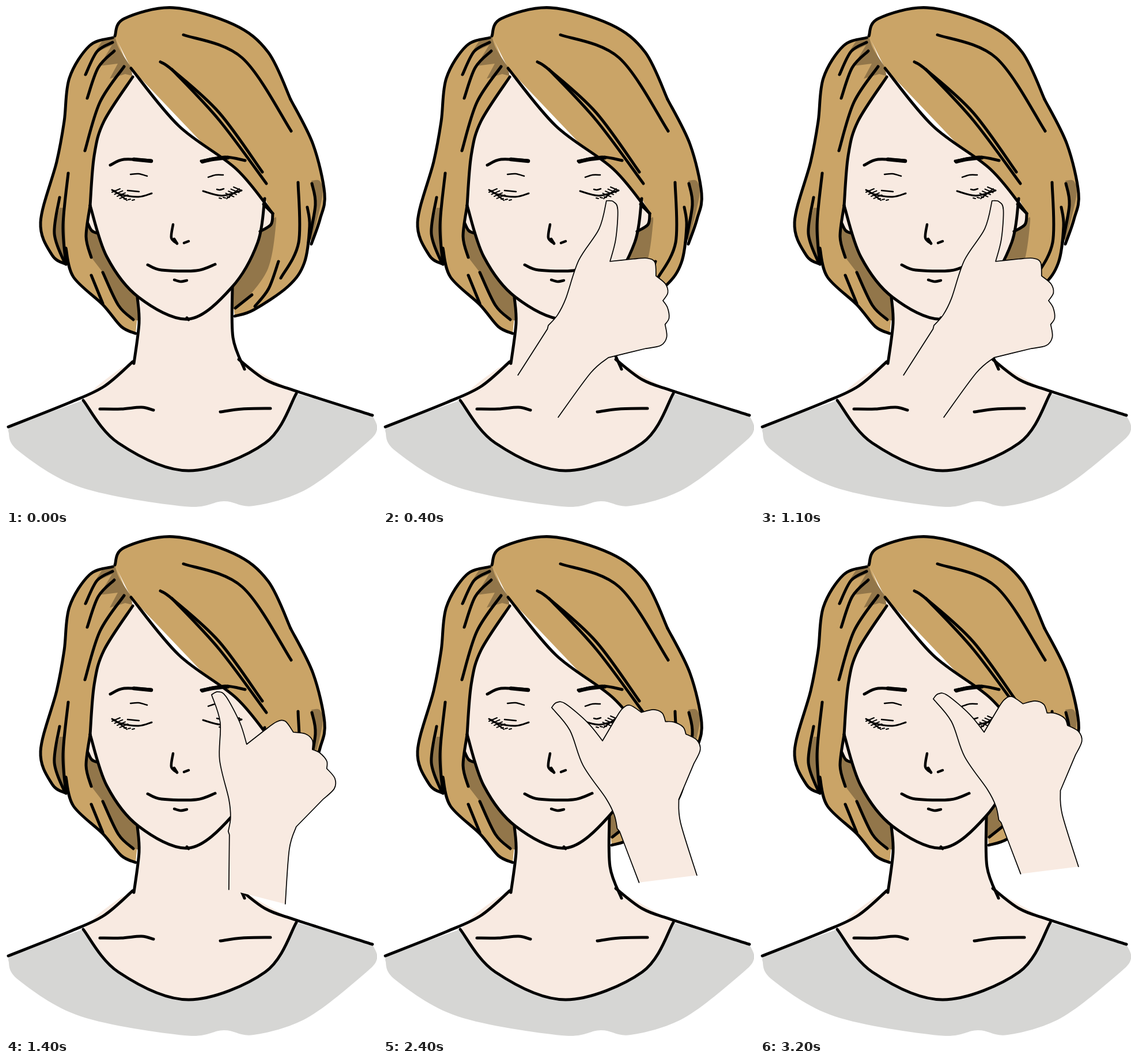
Animation of 644 by 869 pixels, one loop 3.3 s. Source, as an HTML page with a canvas:

```html
<!DOCTYPE html>
<html lang="en">
<head>
<meta charset="utf-8">
<title>Eye massage</title>
<style>
html, body { margin: 0; width: 100%; height: 100%; overflow: hidden; background: #fff; }
canvas { display: block; }
</style>
</head>
<body>
<canvas id="stage" width="644" height="869"></canvas>
<script>
const ctx = document.getElementById('stage').getContext('2d');
const SKIN = '#f8eae1', HAIR = '#caa467', SHADE = '#92764a', SHIRT = '#d6d6d4';
const LOOP = 3300;

function points(text) {
  const n = text.split(' ').map(Number);
  return n.filter((_, i) => i % 2 === 0).map((x, i) => [x, n[2 * i + 1]]);
}

const reversed = text => points(text).reverse().map(p => p.join(' ')).join(' ');

// Each run of points is smooth; runs are joined by straight lines.
function trace(...runs) {
  const path = new Path2D();
  runs.forEach((run, r) => {
    const p = points(run);
    if (r) path.lineTo(...p[0]); else path.moveTo(...p[0]);
    for (let i = 0; i < p.length - 1; i++) {
      const a = p[i - 1] || p[i], b = p[i], c = p[i + 1], d = p[i + 2] || c;
      path.bezierCurveTo(
        b[0] + (c[0] - a[0]) / 6, b[1] + (c[1] - a[1]) / 6,
        c[0] - (d[0] - b[0]) / 6, c[1] - (d[1] - b[1]) / 6,
        c[0], c[1]);
    }
  });
  return path;
}

function fill(color, ...runs) {
  ctx.fillStyle = color;
  ctx.fill(trace(...runs));
}

function ink(width, ...runs) {
  ctx.lineWidth = width;
  for (const run of runs) ctx.stroke(trace(run));
}

const crown = '189 52 205 22 290 3 395 32 455 80 494 162';
const side = '494 162 533 240 553 325 545 370 530 413';
const flick = '523 349 527 382 518 445 490 486 430 527 397 538';
const left = '185 55 145 69 110 125 101 200 88 270 60 375 80 432 104 448';
const leftTail = '104 420 117 470 168 518 200 556 225 568';
const fringe = '217 108 300 208 400 283 463 360';
const inner = '220 123 170 200 153 260 146 346';
const innerTail = '146 346 139 400 148 436';
const lowStrand = '168 462 195 519 221 544';
const jaw = '146 346 175 435 230 505 317 543 392 488 437 410 449 334';
const ear = '463 360 460 379 441 391';
const neckL = '228 505 231 550 222 620';
const neckR = '393 487 394 575 414 630';
const shoulderL = '220 617 170 660 110 688 4 730';
const shoulderR = '404 613 450 648 504 668 636 710';
const neckline = '134 684 195 758 317 806 450 758 504 672';
const hem = '636 710 644 735 620 763 522 838 430 867 378 859 310 868 130 835 22 772 4 738';

function drawHair() {
  fill(HAIR, left, leftTail, '232 500', '220 123', '189 50');
  fill(HAIR, crown, side, flick, '390 480', '400 300', '217 108');
  fill(SHADE, innerTail, lowStrand, '232 546', '228 480', '150 380');
  fill(SHADE, '463 371 469 373 455 455 412 514 394 526', '392 480', '440 380');
  fill(SHADE, '93 350 102 350', '104 446 84 400 93 350');
  fill(SHADE, '530 303 545 304 549 330 530 410', '526 385 537 340 530 303');
  fill(SHADE, '189 53 197 75 219 109', '219 121', '207 118', '180 126', '194 100',
    '162 104', '184 68', '153 82', '166 62 189 53');
}

function drawSkin() {
  fill(SKIN, '228 480', neckL, '200 628 160 658 134 684', neckline, '504 670 430 629 398 600 393 480');
  fill(SHIRT, '4 730', neckline, hem);
  fill(SKIN, '146 346 142 377 160 394');
  fill(SKIN, ear, '449 334');
  fill(SKIN, inner, jaw, reversed(fringe));
}

function drawLines() {
  ink(5, crown, side, flick, left, leftTail, fringe, inner, innerTail, lowStrand);
  // strands
  ink(5,
    '308 50 410 90 495 217', '268 97 290 112 370 185 445 288', '288 110 370 198 452 308',
    '185 63 158 79 138 119', '188 78 160 107 141 160', '205 105 163 167 137 251',
    '108 290 99 380 104 447', '93 332 84 395 102 446', '148 467 168 516',
    '507 306 508 410 477 472', '531 308 537 345 525 411', '473 443 456 490 432 521',
    '398 524 427 501');
  // face edge, neck and shoulders
  ink(5, jaw, ear, '142 377 149 390 159 394', '447 344 463 360', '314 541 317 544',
    neckL, neckR, shoulderL, shoulderR, neckline,
    '163 699 200 699 235 696 256 701', '372 704 410 699 459 698');
  // brows
  ink(5, '181 276 205 266 252 268', '339 269 380 262 415 268');
  ink(6.5, '222 266 252 269', '341 270 358 266 385 263');
  // nose and mouth
  ink(4.5, '290 379 287 402 297 412', '292 404 297 412', '309 411 317 408', '292 475 303 478 314 476');
  ink(5, '246 449 270 458 330 459 363 448');
  // lids
  ink(2.5, '216 292 230 291 245 295', '351 297 364 293 377 293',
    '211 320 231 322', '366 318 371 319 378 317');
  ink(3, '184 319 200 327 230 331 253 325', '342 321 375 329 409 320');
  drawLashes();
  ctx.save();
  ctx.translate(593, -3);
  ctx.scale(-1, 1);
  drawLashes();
  ctx.restore();
}

function drawLashes() {
  for (let i = 0; i < 4; i++) {
    const x = 184 + 4.5 * i, y = 323 + 3.6 * i;
    ink(2, `${x} ${y} ${x + 14} ${y - 6}`);
    if (i < 3) ink(2, `${x + 4} ${y - 3} ${x + 17} ${y + 7}`);
    if (i) ink(2, `${198 + 7 * i} ${334 + i} ${202 + 7 * i} ${333 + i}`);
  }
}

const hand = trace(
  '387 615 388 520', '386 514 390 490 387 458 371 390 372 325 357 277',
  '357 277 368 272 382 280 406 325 418 363', '418 363 450 338',
  '450 338 470 324 485 323 499 342', '499 342 520 345 532 356 532 372',
  '532 372 545 378 557 392 557 405', '557 405 571 422 570 440 551 458',
  '551 458 504 506', '504 506 492 545 485 640');

// The hand turns about the base of the thumb: [time, x, y].
const moves = [
  { from: 0, turn: 32, track: [[0, 391.9, 443], [300, 391.9, 443], [1100, 409, 443]] },
  { from: 1200, turn: 0, track: [[1200, 411, 365.8], [1700, 428, 358.8], [2300, 453, 372]] },
  { from: 2400, turn: -21.5, track: [[2400, 381, 357], [2700, 393, 346], [2900, 402, 351], [3100, 395, 340], [3200, 389, 342]] }
];

function locate(track, t) {
  const i = track.findIndex(k => k[0] > t);
  if (i < 0) return track[track.length - 1].slice(1);
  const a = track[i - 1], b = track[i];
  const u = (t - a[0]) / (b[0] - a[0]);
  return [a[1] + (b[1] - a[1]) * u, a[2] + (b[2] - a[2]) * u];
}

function drawHand(t) {
  const move = moves.filter(m => t >= m.from).pop();
  ctx.save();
  ctx.globalAlpha = Math.min(1, Math.floor(t / 30) / 10);
  ctx.translate(...locate(move.track, t));
  ctx.rotate(move.turn * Math.PI / 180);
  ctx.translate(-418, -363);
  ctx.fillStyle = SKIN;
  ctx.fill(hand);
  ctx.lineWidth = 1.7;
  ctx.stroke(hand);
  ctx.restore();
}

function draw(now) {
  const t = now % LOOP;
  ctx.fillStyle = '#fff';
  ctx.fillRect(0, 0, 644, 869);
  ctx.strokeStyle = '#000';
  ctx.lineCap = ctx.lineJoin = 'round';
  drawHair();
  drawSkin();
  drawLines();
  // fade in on 30 ms steps, then move on 100 ms steps
  if (t >= 30) drawHand(t < 300 ? t : Math.floor(t / 100) * 100);
}

let start = null;
function tick(now) {
  if (start === null) start = now;
  draw(Math.max(0, now - start));
  requestAnimationFrame(tick);
}
requestAnimationFrame(tick);
</script>
</body>
</html>
```
